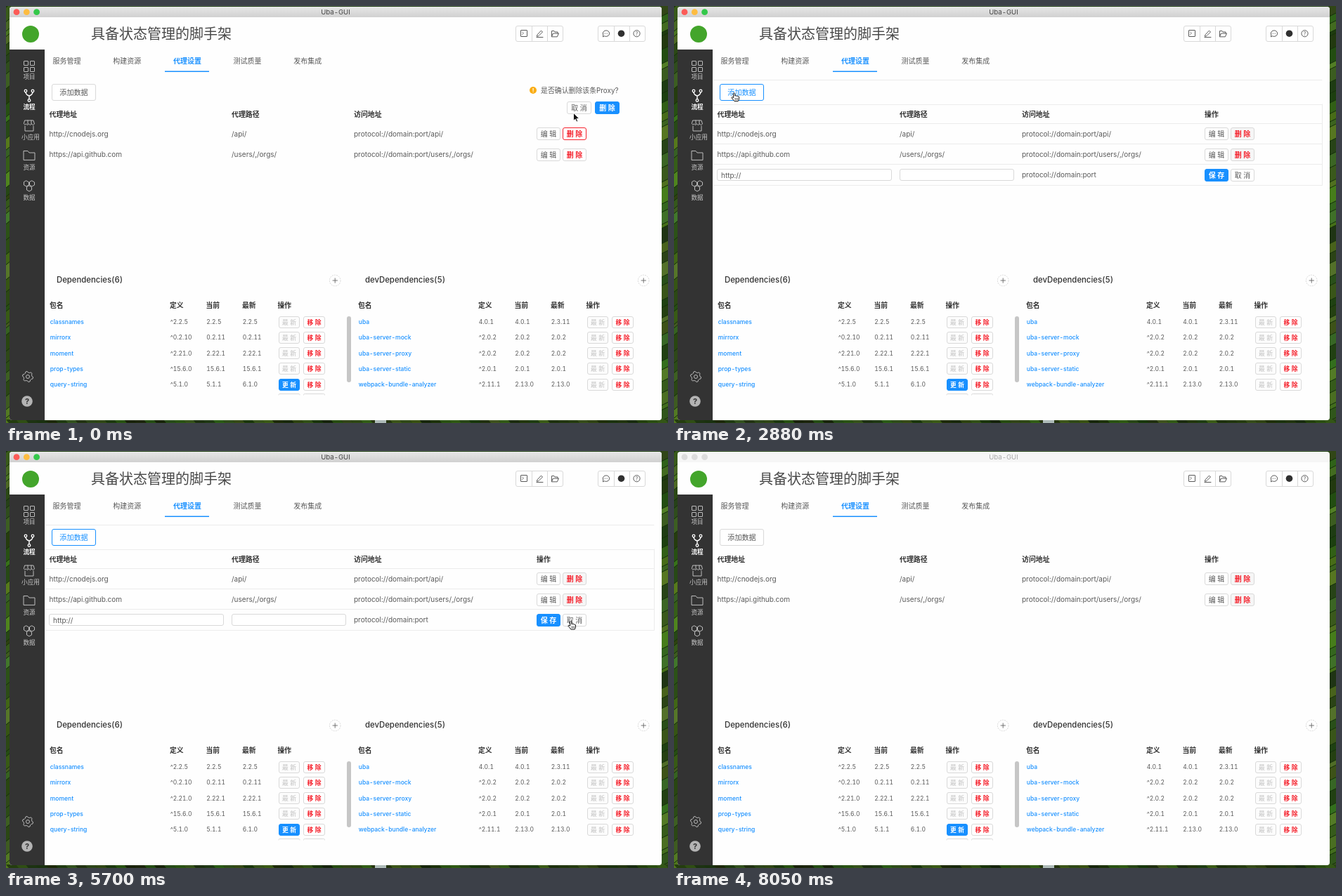
Recreate the animation shown at these times as an HTML page. Size 942 px wide and 594 px high, loop 8.15 s.

```html
<!DOCTYPE html>
<html lang="zh">
<head>
<meta charset="utf-8">
<title>Uba-GUI</title>
<style>
html, body { margin: 0; width: 100%; height: 100%; overflow: hidden; background: #1d3d10; }
svg { display: block; width: 942px; height: 594px; }
text { font-family: Inter, "Noto Sans CJK SC", "Noto Sans CJK", sans-serif; font-variant-numeric: tabular-nums; white-space: pre; }
.light { font-family: "Noto Sans CJK SC Light", "Noto Sans CJK SC", "Noto Sans CJK", sans-serif; font-weight: 300; }
</style>
</head>
<body>
<svg id="stage" viewBox="0 0 942 594"></svg>
<script>
const LOOP = 8150;
const BLUE = '#1890ff', RED = '#f5222d', GREY = '#d9d9d9', INK = '#595959', DARK = '#303030';
const stage = document.getElementById('stage');

function el(parent, tag, attrs = {}, content) {
  const node = document.createElementNS('http://www.w3.org/2000/svg', tag);
  for (const key in attrs) node.setAttribute(key, attrs[key]);
  if (content !== undefined) node.textContent = content;
  return parent.appendChild(node);
}
const group = (parent = stage, attrs) => el(parent, 'g', attrs);
const rect = (p, x, y, width, height, fill, more) => el(p, 'rect', { x, y, width, height, fill, ...more });
const circle = (p, cx, cy, r, fill, more) => el(p, 'circle', { cx, cy, r, fill, ...more });
const path = (p, d, stroke, more) =>
  el(p, 'path', { d, fill: 'none', stroke, 'stroke-width': 1, 'stroke-linejoin': 'round', 'stroke-linecap': 'round', ...more });
const text = (p, x, cy, s, size = 10, fill = INK, more) =>
  el(p, 'text', { x, y: Math.round(cy + size * 0.37), 'font-size': size, fill, ...more }, s);
const centred = (p, x, cy, s, size, fill, more) => text(p, x, cy, s, size, fill, { 'text-anchor': 'middle', ...more });
const box = (p, x, y, w, h, fill, stroke, more) =>
  rect(p, x + 0.5, y + 0.5, w - 1, h - 1, fill, { rx: 2.5, stroke, 'stroke-width': 1, ...more });
const show = (node, on) => node.setAttribute('visibility', on ? 'visible' : 'hidden');
const MEDIUM = { 'font-weight': 500 }, BOLD = { 'font-weight': 700 };

function button(p, x, cy, w, h, label, { size = 10, fill = '#fff', stroke = GREY, color = INK, weight = 400 } = {}) {
  const top = Math.round(cy - h / 2);
  const frame = box(p, x, top, w, h, fill, stroke);
  const caption = centred(p, x + w / 2, top + h / 2, label, size, color, { 'font-weight': weight });
  return { frame, caption };
}
const primary = { fill: BLUE, stroke: BLUE, color: '#fff', weight: 700 };
const danger = { color: RED, weight: 700 };

function drawWallpaper() {
  let seed = 11;
  const random = () => (seed = (seed * 16807) % 2147483647) / 2147483647;
  const shade = (low, span) => `hsl(${82 + random() * 22} ${45 + random() * 20}% ${low + random() * span}%)`;
  rect(stage, 0, 0, 942, 594, '#1d3d10');
  const strip = (x, w) => {
    for (let y = -8; y < 594;) {
      const h = 5 + random() * 18;
      path(stage, `M${x} ${y + 5}l${w} -5v${h}l${-w} 5z`, 'none', { fill: shade(14, 18) });
      path(stage, `M${x} ${y + 5}l${w} -5`, '#16300c');
      y += h;
    }
  };
  strip(0, 6);
  strip(932, 10);
  for (let x = 0; x < 942; x += 14) path(stage, `M${x} 589h14l4 5h-14z`, 'none', { fill: shade(9, 14) });
  rect(stage, 525, 589, 16, 5, '#aebbb8');
}

function drawTitleBar() {
  const outline = 'M5 16V5q0 -4 4 -4H929q4 0 4 4V16z';
  const grad = el(el(stage, 'defs'), 'linearGradient', { id: 'bar', x2: 0, y2: 1 });
  el(grad, 'stop', { offset: 0, 'stop-color': '#e7e7e7' });
  el(grad, 'stop', { offset: 1, 'stop-color': '#d0d0d0' });
  path(stage, outline, 'none', { fill: '#f6f6f6' });
  const bar = path(stage, outline, 'none', { fill: 'url(#bar)' });
  const lights = ['#fc5b57', '#fdbc40', '#34c84a'].map((color, i) =>
    ({ color, node: circle(stage, 15 + i * 14.3, 8.7, 4.4, color) }));
  const title = centred(stage, 469, 8.7, 'Uba-GUI', 9.6, '#444');
  return active => {
    show(bar, active);
    lights.forEach(l => l.node.setAttribute('fill', active ? l.color : '#dcdcdc'));
    title.setAttribute('fill', active ? '#444' : '#aaa');
  };
}

function drawSidebar() {
  path(stage, 'M5 62H55V590H9q-4 0 -4 -4z', 'none', { fill: '#333' });
  const c = '#bdbdbd';
  ['项目', '流程', '小应用', '资源', '数据'].forEach((s, i) => {
    const on = i === 1;
    centred(stage, i === 2 ? 35 : 33, 100.5 + i * 43, s, 8.6, on ? '#fff' : '#c8c8c8', on ? BOLD : {});
  });
  for (const x of [25, 34]) for (const y of [78, 87]) box(stage, x, y, 7, 7, 'none', c, { rx: 0.5 });
  path(stage, 'M28 123q1 4 5 5q4 -1 5 -5M33 128v5', '#fff', { 'stroke-width': 1.4 });
  for (const [x, y] of [[28, 121], [38, 121], [33, 134.5]]) circle(stage, x, y, 1.8, '#333', { stroke: '#fff', 'stroke-width': 1.3 });
  path(stage, 'M27 163h12l1.5 5q-2 3 -4 0q-2 3 -4 0q-2 3 -4 0q-2 2 -3 0zM27 171v7h12v-7M31 163v5M36 163v5', c);
  path(stage, 'M25 219v-12.5h6l2 2.5h8v10z', c);
  const hexagon = (x, y) => path(stage, `M${x} ${y - 4}l3.5 2v4l-3.5 2l-3.5 -2v-4z`, c);
  hexagon(29, 253); hexagon(37, 253); hexagon(33, 260);
  path(stage, Array.from({ length: 24 }, (_, i) => {
    const r = i % 4 < 2 ? 7.6 : 6, a = (i + 0.5) * Math.PI / 12;
    return `${i ? 'L' : 'M'}${(31 + r * Math.cos(a)).toFixed(1)} ${(528 + r * Math.sin(a)).toFixed(1)}`;
  }).join('') + 'z', c);
  circle(stage, 31, 528, 2.5, 'none', { stroke: c });
  circle(stage, 30, 563, 7.8, '#b4b4b4');
  centred(stage, 30, 563, '?', 11, '#333', BOLD);
}

function drawHeader() {
  circle(stage, 35, 40, 12, '#43a52b');
  text(stage, 121, 39.5, '具备状态管理的脚手架', 20, '#484848', { class: 'light' });
  for (const x of [726, 843]) {
    box(stage, x - 1, 28, 68, 23, '#fff', GREY);
    path(stage, `M${x + 22.5} 28.5v22M${x + 44.5} 28.5v22`, GREY);
  }
  box(stage, 732, 34, 10, 10, 'none', INK, { rx: 0.5 });
  path(stage, 'M734.5 37l2 1.8l-2 1.8', INK, { 'stroke-width': 0.8 });
  path(stage, 'M756 41l5.5 -6l2 2l-5.5 5.5l-2.4 .6zM755 44.5h9', INK);
  path(stage, 'M776.5 43.5v-8h3.5l1 1.5h4v2M776.5 43.5l2 -4.5h8l-2 4.5z', INK);
  path(stage, 'M849.5 43.5l.3 -2.3a4.7 4.3 0 1 1 2 1.8z', INK);
  for (const x of [851.3, 853.5, 855.7]) circle(stage, x, 39, 0.6, INK);
  circle(stage, 875.5, 39.2, 4.8, DARK);
  circle(stage, 897.5, 39.2, 4.6, 'none', { stroke: INK });
  centred(stage, 897.5, 39.2, '?', 7, INK);
  ['服务管理', '构建资源', '代理设置', '测试质量', '发布集成'].forEach((s, i) => {
    const on = i === 2;
    text(stage, 66.5 + i * 85.7, 78.5, s, 10, on ? BLUE : INK, on ? BOLD : {});
  });
  rect(stage, 226, 92.5, 63, 1.5, BLUE);
}

function drawPackages(dx, title, rows) {
  const g = group(stage, { transform: `translate(${dx} 0)` });
  text(g, 72, 390, title, 11.35, DARK, MEDIUM);
  circle(g, 468.2, 391, 7.8, '#fff', { stroke: GREY, 'stroke-dasharray': '2 1.2' });
  path(g, 'M465 391h6.5M468.2 387.8v6.5', '#666', { 'stroke-width': 0.9 });
  const cols = [62, 233, 284.5, 336, 386.5];
  ['包名', '定义', '当前', '最新', '操作'].forEach((s, i) => text(g, cols[i], 426, s, 9.8, DARK, BOLD));
  rows.forEach((row, i) => {
    const y = 450.4 + i * 22.15;
    row.split(' ').forEach((s, j) => text(g, cols[j] + 0.8, y - 0.2, s, 8.5, j ? INK : BLUE, j ? {} : MEDIUM));
    const stale = row.startsWith('query');
    button(g, 388, y, 30, 17, stale ? '更 新' : '最 新',
      stale ? { ...primary, size: 8.8 } : { color: '#c0c0c0', size: 8.8, fill: '#fcfcfc' });
    button(g, 423, y, 31, 17, '移 除', { ...danger, size: 8.8 });
  });
  if (!dx) {
    for (const x of [388, 423.5]) path(g, `M${x} 554v-.5q0 -1 2 -1h26q2 0 2 1v.5`, GREY);
    rect(g, 485, 442, 6, 94, '#c6c6c6', { rx: 3 });
  }
}

function drawProxyTable() {
  const view = {};
  const band = (y, h) => rect(stage, 56, y, 866, h, '#e6f7ff');
  view.hover = [band(167, 29), band(197, 28), band(226, 29)];
  const line = y => path(stage, `M56 ${y + 0.5}H922`, '#ececec');
  view.topLines = [line(105), line(140)];
  view.rowLines = [line(167), line(196)];
  view.tableEdge = [line(225), path(stage, 'M922.5 140V226', '#ececec')];
  view.add = button(stage, 65, 123, 63, 24, '添加数据', { size: 10.1 });
  const cols = [61.5, 321, 495, 755];
  ['代理地址', '代理路径', '访问地址', '操作'].forEach((s, i) => text(stage, cols[i], 154, s, 9.9, DARK, BOLD));
  view.actions = [
    ['http://cnodejs.org', '/api/', 'protocol://domain:port/api/'],
    ['https://api.github.com', '/users/,/orgs/', 'protocol://domain:port/users/,/orgs/']
  ].map((row, i) => {
    const y = 182 + i * 29.3;
    row.forEach((s, j) => text(stage, cols[j], y, s));
    return {
      edit: button(stage, 755, y + 0.3, 34, 18, '编 辑'),
      remove: button(stage, 792, y + 0.3, 34, 18, '删 除', danger)
    };
  });

  const draft = view.draft = group();
  path(draft, 'M56 255.5H922.5V226', '#ececec');
  view.input = box(draft, 61, 232, 249, 17, '#fff', GREY);
  box(draft, 321, 232, 163, 17, '#fff', GREY);
  text(draft, 67, 241, 'http://');
  text(draft, 495, 240.5, 'protocol://domain:port');
  button(draft, 755, 240.7, 34, 18, '保 存', primary);
  button(draft, 792, 240.7, 34, 18, '取 消');

  const popup = view.popup = group();
  path(popup, 'M733 105H885V163H813l-4 4l-4 -4H733z', 'none', { fill: '#fefefe' });
  circle(popup, 750, 120, 5, '#faad14');
  centred(popup, 750, 120, '!', 8, '#fff', BOLD);
  text(popup, 761, 120, '是否确认删除该条Proxy?', 9.9);
  button(popup, 798, 144.5, 35, 18, '取 消');
  button(popup, 838, 144.5, 35, 18, '删 除', primary);
  return view;
}

function drawCursors() {
  const arrow = group(), hand = group(), beam = group();
  path(arrow, 'M0 0V11l2.6 -2.3l1.7 3.9l1.9 -.8l-1.7 -3.8h3.5z', '#fff', { fill: '#111', 'stroke-width': 0.9 });
  path(hand, 'M-1 1q1.2 -1.5 2.2 0v3.5q1.2 -.9 2 .3q1.2 -.8 2 .4q1.5 -.5 1.8 .8v3q-.2 1.5 -1.2 3h-5.5q-1.4 -2 -4 -5q.3 -1.6 2.7 -.2z', '#111', { fill: '#fff' });
  path(hand, 'M1.5 8v2M3.3 8v2M5.1 8v2', '#111', { 'stroke-width': 0.7 });
  path(beam, 'M-2.5 -6q2 0 2.5 1q.5 -1 2.5 -1M0 -5v10M-2.5 6q2 0 2.5 -1q.5 1 2.5 1', '#222');
  return { arrow, hand, beam };
}

drawWallpaper();
path(stage, 'M5 16H933V586q0 4 -4 4H9q-4 0 -4 -4z', 'none', { fill: '#fefefe' });
const setActive = drawTitleBar();
drawSidebar();
drawHeader();
drawPackages(0, 'Dependencies(6)', [
  'classnames ^2.2.5 2.2.5 2.2.5', 'mirrorx ^0.2.10 0.2.11 0.2.11', 'moment ^2.21.0 2.22.1 2.22.1',
  'prop-types ^15.6.0 15.6.1 15.6.1', 'query-string ^5.1.0 5.1.1 6.1.0']);
drawPackages(439, 'devDependencies(5)', [
  'uba 4.0.1 4.0.1 2.3.11', 'uba-server-mock ^2.0.2 2.0.2 2.0.2', 'uba-server-proxy ^2.0.2 2.0.2 2.0.2',
  'uba-server-static ^2.0.1 2.0.1 2.0.1', 'webpack-bundle-analyzer ^2.11.1 2.13.0 2.13.0']);
const table = drawProxyTable();
const cursors = drawCursors();

// time, x, y, pointer shape from this moment on
const route = [
  [0, 807.5, 152.5, 'arrow'], [400, 807.5, 152.5, 'arrow'], [700, 800, 172, 'arrow'], [1100, 770, 178, 'arrow'],
  [1820, 137, 135, 'arrow'], [1870, 137, 135, 'arrow'], [2130, 32, 126, 'arrow'], [2280, 62, 124, 'arrow'],
  [2420, 85.5, 123.5, 'hand'], [3030, 85.5, 123.5, 'arrow'], [3470, 410, 242, 'arrow'],
  [3600, 438, 259.5, 'arrow'], [3800, 438, 259.5, 'arrow'], [4100, 300, 212, 'arrow'],
  [4350, 144.5, 241.5, 'beam'], [4980, 144.5, 241.5, 'arrow'], [5400, 640, 262, 'arrow'],
  [5650, 803.5, 242, 'hand'], [6150, 803.5, 242, 'arrow'], [6260, 812, 236.5, 'arrow'],
  [6310, 812, 236.5, 'arrow'], [7250, 720, 578, 'arrow']
];

function pointerAt(t) {
  let i = 0;
  while (i < route.length - 2 && route[i + 1][0] <= t) i++;
  const [t0, x0, y0, shape] = route[i], [t1, x1, y1] = route[i + 1];
  const k = Math.min(1, Math.max(0, (t - t0) / (t1 - t0)));
  return { x: x0 + (x1 - x0) * k, y: y0 + (y1 - y0) * k, shape };
}

function render(now) {
  const TICK = 147.9;
  const t = Math.max(0, Math.floor((now - 1088) / TICK) * TICK + 1108);
  const during = (a, b) => t >= a && t < b;
  const active = now < 8050;
  setActive(active);

  table.popup.setAttribute('opacity', t < 430 ? 1 : t < 570 ? 0.5 : 0);
  table.topLines.forEach(n => show(n, t > 430 && active));
  table.rowLines.forEach(n => show(n, t > 1970 && active));
  table.tableEdge.forEach(n => show(n, t > 2700 && active));

  const rowHover = [during(570, 1970), during(4050, 4300), during(3300, 3800) || during(4300, 5350)];
  table.hover.forEach((n, i) => show(n, rowHover[i]));
  table.actions.forEach(({ edit, remove }, i) => {
    const tinted = !i && rowHover[0];
    edit.frame.setAttribute('fill', tinted ? '#e9f4f9' : '#fff');
    remove.frame.setAttribute('fill', tinted ? '#f9cfcf' : t > 1970 ? '#f6f6f6' : '#fff');
    remove.frame.setAttribute('stroke', !i && t < 570 ? RED : tinted ? '#f0b4b4' : GREY);
  });

  const adding = during(2400, 6260);
  table.add.frame.setAttribute('stroke', adding ? BLUE : GREY);
  table.add.caption.setAttribute('fill', adding ? BLUE : INK);
  show(table.draft, during(2700, 6260));
  table.input.setAttribute('stroke', during(3150, 3800) || during(4300, 5080) ? '#69b8f5' : GREY);

  const { x, y, shape } = pointerAt(t);
  for (const name in cursors) {
    show(cursors[name], name === shape && t < 7280);
    cursors[name].setAttribute('transform', `translate(${x} ${y})`);
  }
}

const start = performance.now();
function tick() {
  render((performance.now() - start) % LOOP);
  requestAnimationFrame(tick);
}
tick();
</script>
</body>
</html>
```
